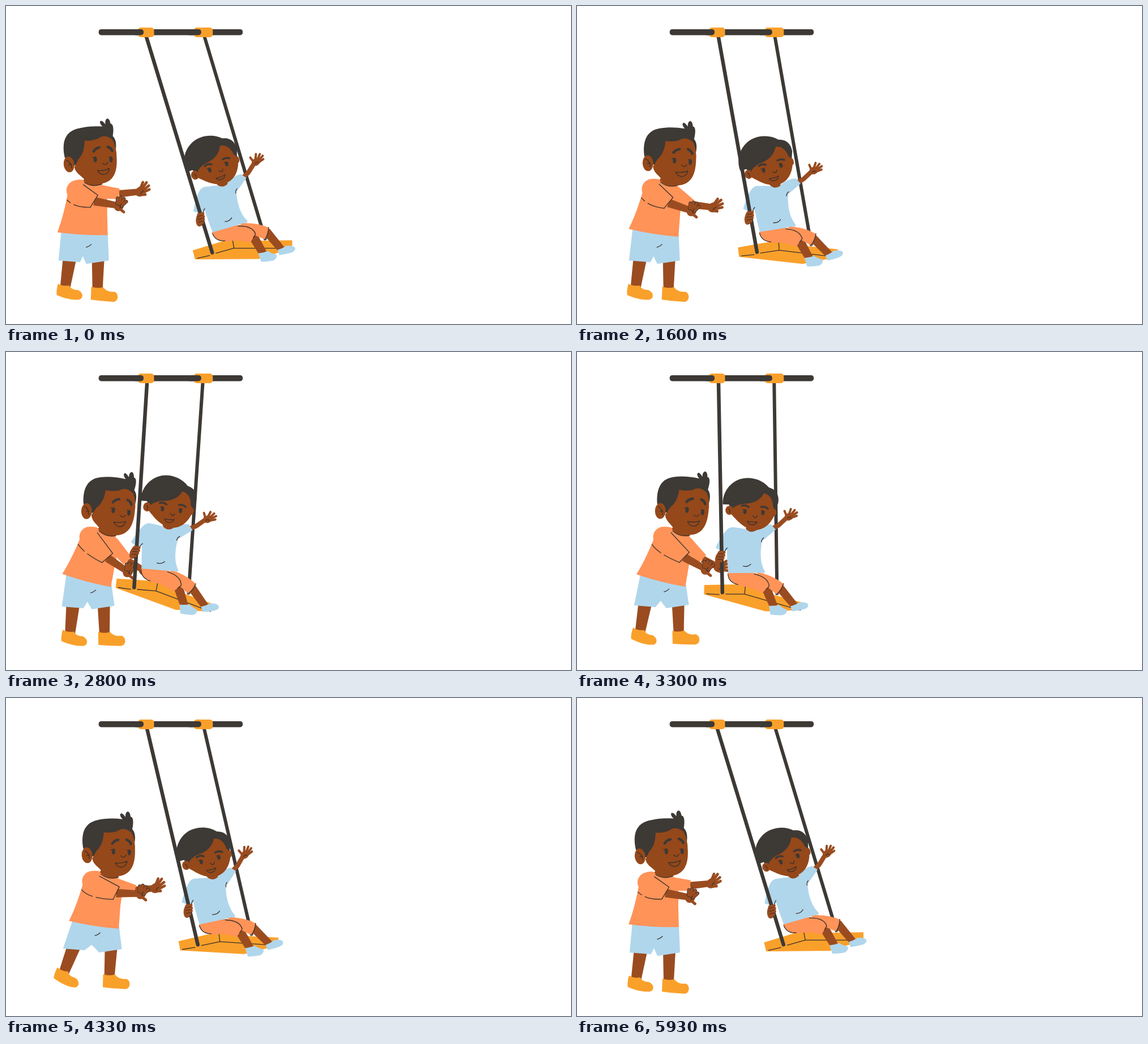
Animation of 998 by 561 pixels, one loop 6.01 s. Source, as an HTML page with a canvas:

```html
<!DOCTYPE html>
<html lang="en">
<head>
<meta charset="utf-8">
<title>Swing</title>
<style>
html, body { margin: 0; width: 100%; height: 100%; overflow: hidden; background: #fff; }
canvas { display: block; width: 998px; height: 561px; }
</style>
</head>
<body>
<canvas id="stage" width="998" height="561"></canvas>
<script>
const ctx = document.getElementById('stage').getContext('2d');
const LOOP = 6010, CYCLE = 6000, RAD = Math.PI / 180;
const SCALE = .998; // the scene is laid out 1000 units wide
const SKIN = '#95481a', LIMB = '#9a4c20', DARK = '#3d3935', SHIRT = '#ff9358',
      BLUE = '#b0d6ec', GOLD = '#f9a02b', INK = '#3b302b';

// --- timing -------------------------------------------------------------

const KEYS = [0, 1600, 2300, 3300, 4330, 5130];

// Periodic cubic through the given key values.
function track(values, times = KEYS) {
  const n = values.length;
  const at = i => values[((i % n) + n) % n];
  const when = i => times[((i % n) + n) % n] + CYCLE * Math.floor(i / n);
  const slope = i => (at(i + 1) - at(i - 1)) / (when(i + 1) - when(i - 1));
  return t => {
    let i = n - 1;
    while (times[i] > t) i--;
    const h = when(i + 1) - when(i), u = (t - when(i)) / h, v = 1 - u;
    return at(i) * v * v * (1 + 2 * u) + at(i + 1) * u * u * (3 - 2 * u)
      + h * u * v * (slope(i) * v - slope(i + 1) * u);
  };
}

function pointTrack(xs, ys, times) {
  const x = track(xs, times), y = track(ys, times);
  return t => [x(t), y(t)];
}

// Cubic bezier ease (.25, .1, .25, 1)
function ease(x) {
  const curve = (s, a, b) => 3 * a * s * (1 - s) ** 2 + 3 * b * s * s * (1 - s) + s ** 3;
  let lo = 0, hi = 1;
  for (let i = 0; i < 24; i++) {
    const mid = (lo + hi) / 2;
    if (curve(mid, .25, .25) < x) lo = mid; else hi = mid;
  }
  return curve(lo, .1, 1);
}

function swingAngle(t) {
  const away = t < 2780 ? 2768 - t : t - 2792;
  return 20.7 * (1 - ease(Math.min(1, Math.max(0, away / 3000))));
}

const STEP = [0, 1600, 2300, 3300, 3850, 4330, 5130];
const boy = {
  hip: pointTrack([0, 0, 1.5, 13, 20, 8], [0, -1.5, .5, 1.5, -1.5, -1]),
  lean: track([0, 5.7, 11.1, 11, 5.7, 1.3]),
  head: pointTrack([0, 14, 24, 36, 32, 14], [0, -2, 1, 1, -2, -2]),
  nod: track([0, 5.2, 8.4, 8.7, 3, 2]),
  nearElbow: pointTrack([156, 162, 168, 190, 195, 175], [345, 348, 361, 363, 345, 343]),
  nearHand: pointTrack([200, 203, 204, 228, 239, 216], [353, 362, 385, 384, 346, 348]),
  farElbow: pointTrack([200, 202, 208, 222, 228, 211], [332, 351, 367, 366, 340, 336]),
  farHand: pointTrack([238, 241, 240, 252, 265, 248], [328, 356, 383, 381, 336, 332]),
  leftKnee: pointTrack([113, 112, 116, 121, 121, 115], [449, 449, 450, 447, 442, 446]),
  leftAnkle: pointTrack([105, 104, 112, 112, 101, 103, 102], [494, 494, 496, 491, 484, 482, 489], STEP),
  leftTilt: track([0, 0, -1, 4, 13, 13, 6], STEP),
  rightKnee: pointTrack([163, 163, 167, 179, 186, 173], [452, 452, 452, 449, 446, 448]),
  rightAnkle: pointTrack([162, 162, 168, 180, 183, 171], [500, 500, 500, 496, 492, 497]),
  rightTilt: track([0, 0, -2, -4, -1, -2])
};
const girl = {
  nod: track([0, -2.8, 2, 7.6, 2, -1.4]),
  shin: track([0, -5.7, -7.6, -7.6, -4.3, -2.2]),
  wave: t => 7 * Math.sin(2 * Math.PI * (t - 60) / CYCLE)
};

// --- drawing helpers ----------------------------------------------------

function fill(d, color) {
  ctx.fillStyle = color;
  ctx.fill(new Path2D(d));
}

function line(d, width = 1.3, color = INK) {
  ctx.strokeStyle = color;
  ctx.lineWidth = width;
  ctx.stroke(new Path2D(d));
}

function oval(x, y, rx, ry, turn, color) {
  ctx.fillStyle = color;
  ctx.beginPath();
  ctx.ellipse(x, y, rx, ry, turn * RAD, 0, 7);
  ctx.fill();
}

function bar(x, y, w, h, r, color) {
  ctx.fillStyle = color;
  ctx.beginPath();
  ctx.roundRect(x, y, w, h, r);
  ctx.fill();
}

// Turn about (px, py), then shift.
function group(px, py, deg, [dx, dy], draw) {
  ctx.save();
  ctx.translate(px + dx, py + dy);
  ctx.rotate(deg * RAD);
  ctx.translate(-px, -py);
  draw();
  ctx.restore();
}

function sides(a, b, wa, wb) {
  const len = Math.hypot(b[0] - a[0], b[1] - a[1]);
  const nx = (b[1] - a[1]) / len / 2, ny = (a[0] - b[0]) / len / 2;
  const off = (p, w) => [p[0] + nx * w, p[1] + ny * w];
  return [off(a, wa), off(b, wb), off(b, -wb), off(a, -wa)];
}

const poly = pts => 'M' + pts.map(p => p.join(' ')).join('L');

function limb(a, b, wa, wb, color) {
  const s = sides(a, b, wa, wb);
  fill(poly(s) + 'Z', color);
  return s;
}

// --- boy ----------------------------------------------------------------

function hand(at, deg, fingers, thumb, outlined) {
  group(0, 0, deg, at, () => {
    oval(0, 0, 10, 8.5, 0, LIMB);
    if (outlined) fingers.forEach(f => line(f, 6.2, INK));
    fingers.forEach(f => line(f, 4.7, LIMB));
    line(thumb, 5, LIMB);
    line('M-2 4Q1 1 5 2');
  });
}

function boyHead() {
  fill('M104 268C98 240 105 223 126 217C140 213 155 212 171 213C166 209 165 204 168 203C171 203 174 207 176 209C175 203 177 199 180 199C184 201 184 205 185 208C190 208 191 218 189 230Q197 238 194 256L135 278L120 282Z', DARK);
  fill('M139 238Q153 239 164 234C173 226 184 233 188 236Q196 248 196 270C197 294 190 308 174 313C158 317 144 312 133 301Q122 293 121 285Q125 277 128 271Q139 260 139 238Z', SKIN);
  oval(111.5, 280, 9.5, 14, -8, SKIN);
  line('M107 273Q115 275 116 286M111 281Q114 278 116 280');
  line('M155 257Q159 251 165 250M180 249Q186 251 188 256', 4.6, DARK);
  oval(158, 271, 3, 5.3, 0, DARK);
  oval(186, 271, 3, 5.3, 0, DARK);
  line('M153 268L157 268M182 267L185 268');
  line('M171 278Q178 283 180 276');
  line('M162 291Q173 292 183 287Q181 298 172 298Q165 297 162 291Z');
}

const LEFT_SHOE = 'M92 491C90 498 89 506 90 511C104 517 117 520 129 519C138 517 137 506 127 502C119 502 114 499 112 494Q101 496 92 491Z';
const RIGHT_SHOE = 'M151 496L150 519Q170 522 190 523C200 522 200 508 192 505C183 506 176 503 172 497Q161 500 151 496Z';

function drawBoy(t) {
  const hip = boy.hip(t), lean = boy.lean(t);
  const c = Math.cos(lean * RAD), s = Math.sin(lean * RAD);
  const onTorso = (x, y) => {
    const u = x - 135.5, v = y - 402.5;
    return [135.5 + hip[0] + u * c - v * s, 402.5 + hip[1] + u * s + v * c];
  };

  const lk = boy.leftKnee(t), la = boy.leftAnkle(t);
  const rk = boy.rightKnee(t), ra = boy.rightAnkle(t);
  limb([lk[0], lk[1] - 5], [la[0], la[1] + 2], 24, 18, LIMB);
  limb([rk[0], rk[1] - 5], [ra[0], ra[1] + 1], 22, 18, LIMB);
  group(105, 494, boy.leftTilt(t), [la[0] - 105, la[1] - 494], () => fill(LEFT_SHOE, GOLD));
  group(162, 500, boy.rightTilt(t), [ra[0] - 162, ra[1] - 500], () => fill(RIGHT_SHOE, GOLD));

  const fork = [(lk[0] + rk[0]) / 2 - 2, (lk[1] + rk[1]) / 2 - 8];
  fill(poly([
    onTorso(98, 395), onTorso(180, 400), [rk[0] + 19, rk[1] - 2], [rk[0] - 21, rk[1] + 4],
    fork, [lk[0] + 18, lk[1] + 4], [lk[0] - 20, lk[1] + 1]
  ]) + 'Z', BLUE);
  line(`M${fork[0] + 6} ${fork[1] - 16}q5 -1 9 -5`);

  // far arm
  const fe = boy.farElbow(t), fh = boy.farHand(t);
  const farDeg = Math.atan2(fh[1] - fe[1], fh[0] - fe[0]) / RAD;
  limb(fe, fh, 13, 11, LIMB);
  hand(fh, farDeg - 29,
    ['M2 -4L13 -11', 'M3 -2L18 -7', 'M3 1L18 0', 'M2 4L15 6'], 'M-4 4L4 9', false);
  limb(onTorso(166, 328), fe, 24, 19, SHIRT);

  group(135.5, 402.5, lean, hip, () => {
    fill('M91 400C100 376 105 354 110 328C111 312 121 306 134 307L170 316C181 328 180 348 179 365L180 405Q135 406 91 400Z', SHIRT);
    fill('M137 309Q152 322 171 315L168 300L140 300Z', SKIN);
    line('M139 312Q153 321 169 315');
  });

  group(112, 280, boy.nod(t), boy.head(t), boyHead);

  // near arm
  const ne = boy.nearElbow(t), nh = boy.nearHand(t), shoulder = onTorso(125, 326);
  limb(ne, nh, 15, 11, LIMB);
  hand(nh, -58,
    ['M2 -5L10 -9', 'M3 -2L14 -5', 'M3 1L15 1', 'M2 4L13 7'], 'M-4 4L-5 13', true);
  oval(shoulder[0], shoulder[1], 18, 18, 0, SHIRT);
  const [, top, low] = limb(shoulder, ne, 36, 25, SHIRT);
  line(poly([onTorso(137, 316), top, low]));
  ctx.setLineDash([30, 7, 40]);
  line(`M${low}Q${onTorso(122, 357)} ${onTorso(108, 343)}`);
  ctx.setLineDash([]);
}

// --- swing and girl -----------------------------------------------------

function girlHead() {
  fill('M320 294C312 278 314 256 330 241C345 228 367 226 383 234C397 232 406 240 409 253L409 273L345 302L330 290Z', DARK);
  oval(410, 271, 3, 6, -15, SKIN);
  fill('M340 291Q346 281 358 276C372 269 378 258 379 247Q394 244 403 262L411 268C413 288 407 302 397 309C385 319 364 315 350 308Q342 305 338 302Z', SKIN);
  oval(335, 299, 7, 8, -20, SKIN);
  line('M333 297Q337 298 337 303');
  line('M352 283Q357 278 364 280M384 271Q390 267 396 269', 3.4, DARK);
  oval(361, 290, 3, 4.3, -15, DARK);
  oval(391, 279, 3, 4.3, -15, DARK);
  line('M356 288L360 288M387 277L390 277');
  line('M377 291Q384 296 384 288');
  line('M372 304Q380 303 388 298Q387 306 380 307Q375 308 372 304Z');
}

function girlArm() {
  line('M419 304L429 295L438 281', 8, LIMB);
  oval(443, 276, 8, 6.5, -35, LIMB);
  line('M439 276L433 268M442 273L443 262M445 273L450 262M447 274L455 265M447 277L456 271', 4, LIMB);
  line('M441 279Q444 275 447 277');
  fill('M392 315Q402 300 416 297L426 304L410 326L396 335Z', BLUE);
  line('M409 323Q406 327 407 331');
}

function drawSwing(t) {
  const shin = girl.shin(t);
  ctx.save();
  ctx.beginPath();
  ctx.rect(0, 47, 1000, 515);
  ctx.clip();
  group(350, 46, swingAngle(t), [0, 0], () => {
    line('M348.8 46L459 411', 6, DARK);

    fill('M331 432L400 411L430 415L507 414L507 428L448 447L335 448Z', GOLD);
    line('M401 411L404 428L372 437M339 446L361 441M404 428L507 428');

    group(466, 402, shin * 2, [0, 0], () => {
      limb([461, 398], [488, 430], 15, 13, LIMB);
      fill('M481 431Q491 428 496 424Q507 422 512 427Q514 433 505 436Q495 439 484 440Z', BLUE);
    });
    group(440, 405, shin, [0, 0], () => {
      limb([435, 402], [456, 438], 17, 14, LIMB);
      fill('M447 437Q457 436 464 433Q472 438 479 439Q482 446 473 450Q462 452 452 452Z', BLUE);
    });

    fill('M412 384Q445 382 466 392L460 413L440 405Z', SHIRT);
    line('M465 391Q465 403 459 412');
    fill('M365 400Q386 389 414 387Q438 391 442 403L433 418Q408 412 396 416Q371 418 365 400Z', SHIRT);
    line('M411 389Q437 388 442 403L438 410M366 402Q371 416 388 415');

    oval(344, 377, 7.5, 13, 8, LIMB);
    fill('M351 320Q369 317 377 317L392 313L406 305L408 330Q411 364 428 380Q427 385 424 383Q395 392 366 400Q359 382 352 361L347 368L332 363Q336 340 342 328Q345 322 351 320Z', BLUE);
    line('M352 358Q349 362 350 368M388 381Q396 381 400 374');
    fill('M374 316Q384 323 393 314L390 306L375 308Z', SKIN);

    group(405, 318, girl.wave(t), [0, 0], girlArm);
    group(382, 314, girl.nod(t), [0, 0], girlHead);

    line('M247 50L365.5 436', 6.5, DARK);
    line('M341 369L349 367M341 374L350 372M342 379L350 377M342 384L348 383', 5, LIMB);
    line('M340 372L348 370M340 377L349 375M341 382L348 380', 1, INK);
  });
  ctx.restore();
}

function drawFrame() {
  bar(164, 41, 255, 10.5, 4.5, DARK);
  bar(233.5, 38, 28.5, 17, 5, GOLD);
  bar(332.5, 38, 33.5, 17, 5, GOLD);
  bar(225, 41, 18.5, 10.5, 4.5, DARK);
  bar(320, 41, 25.5, 10.5, 4.5, DARK);
}

function render(ms) {
  // two pictures per tenth of a second
  const tick = Math.min(59, Math.floor(ms / 100));
  const t = tick * 100 + (ms - tick * 100 < 30 ? 0 : 100 / 3);
  ctx.clearRect(0, 0, 1000, 562);
  drawBoy(t);
  drawSwing(t);
  drawFrame();
}

ctx.scale(SCALE, SCALE);
ctx.lineCap = ctx.lineJoin = 'round';
const start = performance.now();
function loop() {
  render((performance.now() - start) % LOOP);
  requestAnimationFrame(loop);
}
loop();
</script>
</body>
</html>
```
